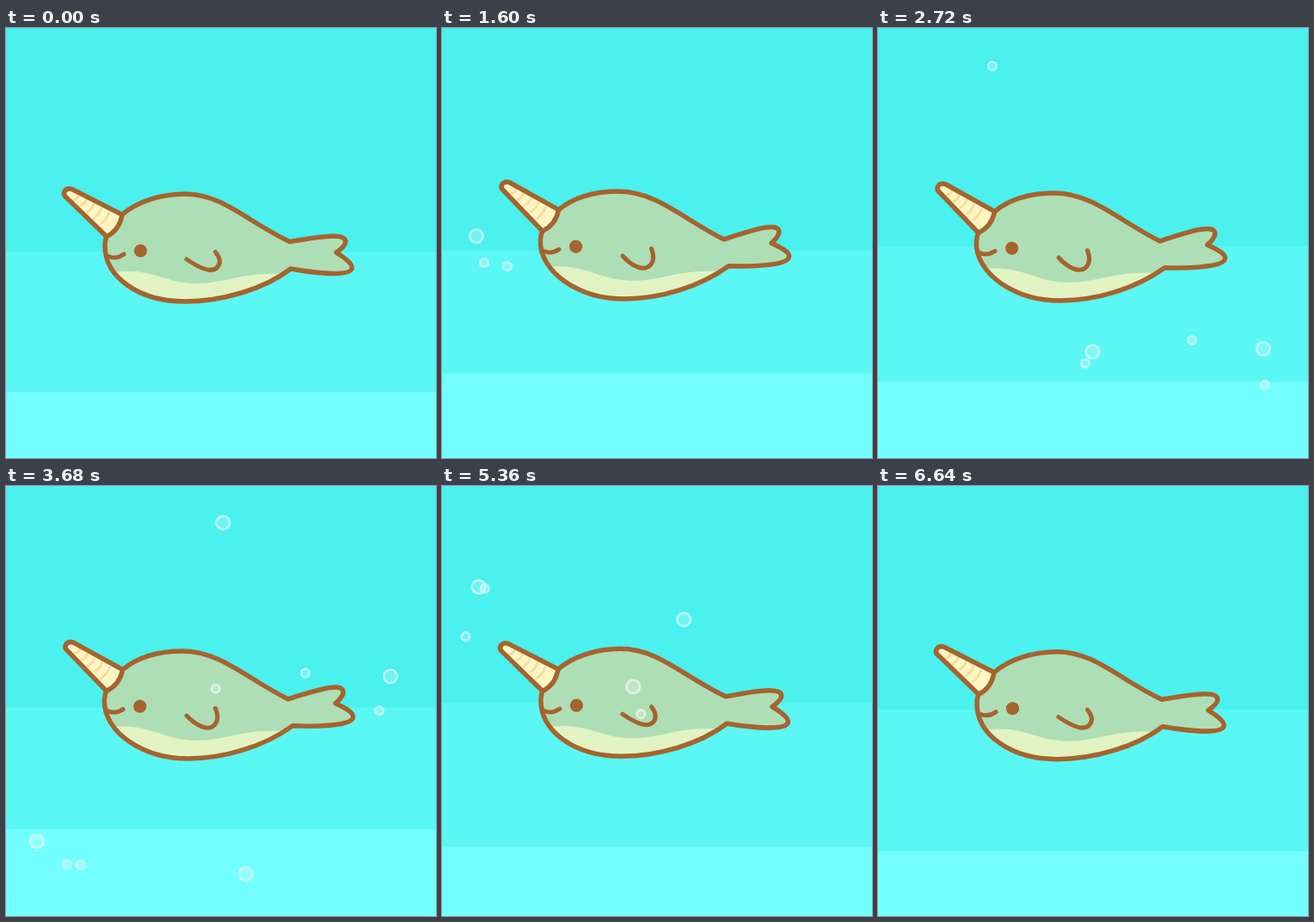
An HTML page with a canvas that plays this animation: 500 px wide and 500 px high, repeating every 6720 ms.

```html
<!DOCTYPE html>
<html lang="en">
<head>
<meta charset="utf-8">
<title>Narwhal</title>
<style>
  html, body { margin: 0; width: 100%; height: 100%; overflow: hidden; background: #4af1ee; }
  canvas { display: block; width: 100vmin; height: 100vmin; }
</style>
</head>
<body>
<canvas id="stage" width="500" height="500"></canvas>
<script>
const ctx = document.getElementById('stage').getContext('2d');
const LOOP = 6720, STEP = 80, TAU = 2 * Math.PI;
const BROWN = '#a5642e';

const mix = (a, b, u) => a + (b - a) * u;

// From 1 down to 0 and back, easing out both ways, n times per loop.
function swing(t, n) {
  const p = t * n / LOOP % 1;
  return p < .5 ? (1 - 2 * p) ** 3 : 1 - (2 - 2 * p) ** 3;
}

const upperWater = t => 252.5 + 7.5 * swing(t, 3);

// A wave that falls quickly and rises slowly, on a longer swell.
function lowerWater(t) {
  const a = TAU * t * 6 / LOOP;
  return 414 + 12 * Math.cos(a + .84 + .87 * Math.cos(a - 1.75)) + 4.8 * Math.sin(a / 2);
}

// Each wave: the time at which its bubbles are at the given places.
const bubble = (x, y, drift, pace, r = 6, behind = false) => ({ x, y, drift, pace, r, behind });
const waves = [
  [1600, bubble(40, 242, 5, 150, 9), bubble(49, 273, 5, 90), bubble(76, 277, 48, 50)],
  [2720, bubble(249.5, 376.5, 3, 220, 9, true), bubble(241, 390, 3, 17),
    bubble(365, 363, -18, 7), bubble(448, 373, -1, 14.2, 9), bubble(450, 415, -17, 16.5)],
  [3680, bubble(36, 413, 3, 11, 9), bubble(71, 440, -20, 4.5), bubble(87, 441, -17, 16.5),
    bubble(279, 451, 1, 11, 9, true)],
  [4640, bubble(234, 347, -19, 25, 9), bubble(235, 380, -6, 28)]
];

// Bubbles rise steadily, then faster and drifting sideways.
function drawBubbles(t, behind) {
  ctx.lineWidth = 2.6;
  ctx.strokeStyle = 'rgba(255,255,255,.58)';
  ctx.fillStyle = 'rgba(255,255,255,.22)';
  for (const [time, ...group] of waves) {
    const s = (t - time) / 1000, after = Math.max(0, s);
    for (const b of group.filter(b => b.behind === behind)) {
      const x = b.x + b.drift * after ** 1.5;
      const y = b.y - s * (s < 0 ? 170 : 145) - b.pace * after ** 3;
      ctx.beginPath();
      ctx.arc(x, y, b.r - 1.2, 0, TAU);
      ctx.fill();
      ctx.stroke();
    }
  }
}

// Returns a function that turns a point around a centre, as path text.
function turner(cx, cy, angle) {
  const c = Math.cos(angle), s = Math.sin(angle);
  return (x, y) => `${cx + (x - cx) * c - (y - cy) * s} ${cy + (x - cx) * s + (y - cy) * c} `;
}

function line(path, width = 5.5, color = BROWN) {
  ctx.lineWidth = width;
  ctx.strokeStyle = color;
  ctx.stroke(new Path2D(path));
}

function fill(path, color) {
  ctx.fillStyle = color;
  ctx.fill(new Path2D(path));
}

function drawBody(lift, headAngle) {
  const H = turner(210, 235, headAngle);
  const T = turner(331, 264, -lift * .148);
  const top = 208 - 3 * lift, low = 208 + 4 * lift;
  const body =
    'M' + H(135, 217) + 'C' + H(152, 202) + `${top - 28} 193 ${top} 193` +
    `C${top + 44} 193 280 225 ` + T(330, 248.5) +
    'C' + T(350, 245) + T(368, 242) + T(380, 242) +
    'C' + T(398, 242) + T(400, 250) + T(384, 261) +
    'C' + T(395, 268) + T(404, 275) + T(402, 280) +
    'C' + T(399, 289) + T(360, 285) + T(331, 280) +
    `C300 304 ${low + 42} 318 ${low} 318 C${low - 53} 318 ` + H(115, 290) + H(115, 253) +
    'Q' + H(115, 247) + H(117, 242) + 'Z';
  fill(body, '#aedeb6');
  ctx.save();
  ctx.clip(new Path2D(body));
  fill('M' + H(100, 286) + 'L' + H(112, 286) + 'C' + H(168, 275) +
    '178 296 220 297 C255 297 275 284 318 286 L345 287 V330 H100Z', '#e1f3c3');
  ctx.restore();
  line(body);

  // The flipper curls as the tail lifts.
  const F = (x, y, x2, y2) => `${mix(x, x2, lift)} ${mix(y, y2, lift)} `;
  line('M' + F(210, 269, 210, 268) +
    'C' + F(228, 281, 220, 279) + F(240, 285, 234, 287) + F(246, 278, 242, 279) +
    'C' + F(251, 272, 247, 274) + F(248, 266, 246, 266) + F(243.5, 260.5, 243.5, 259.5), 5);
}

function drawHead(angle, open) {
  ctx.save();
  ctx.translate(210, 235);
  ctx.rotate(angle);
  ctx.translate(-210, -235);

  const horn = 'M135 217L77 187.5Q71 185.5 68 190Q66 194 70 197L117 242.5Q132 235 135 217Z';
  fill(horn, '#fff6c4');
  for (let u = .17; u < .85; u += .155) {
    const upper = [mix(76, 135, u), mix(188, 217, u)];
    const lower = [mix(68, 117, u), mix(194, 243, u)];
    const across = (v, i) => mix(upper[i], lower[i], v);
    line(`M${across(.18, 0)} ${across(.18, 1)}` +
      `Q${across(.47, 0) + 2} ${across(.47, 1) + 1.6} ${across(.76, 0)} ${across(.76, 1)}`,
      2.8, '#f6dca0');
  }
  line(horn);

  line('M119 265.5Q128 269.5 137 263', 5);
  ctx.beginPath();
  ctx.ellipse(156.5, 259, 7.6, 7.6 * open, 0, 0, TAU);
  ctx.fillStyle = BROWN;
  ctx.fill();
  ctx.restore();
}

function draw(t) {
  ctx.fillStyle = '#4af1ee';
  ctx.fillRect(0, 0, 500, 500);
  ctx.fillStyle = '#5bf7f4';
  ctx.fillRect(0, upperWater(t), 500, 500);
  ctx.fillStyle = '#74ffff';
  ctx.fillRect(0, lowerWater(t), 500, 500);

  drawBubbles(t, true);
  const lift = 1 - swing(t, 6);
  const headAngle = lift * .036;
  const blink = Math.min(1, .1 + Math.abs(t - 4700) / 115);
  ctx.save();
  ctx.translate(0, 2 * Math.cos(TAU * t * 7 / LOOP) - 2);
  drawBody(lift, headAngle);
  drawHead(headAngle, blink);
  ctx.restore();
  drawBubbles(t, false);
}

ctx.lineCap = ctx.lineJoin = 'round';
const start = performance.now();
function tick() {
  const t = (performance.now() - start) % LOOP;
  draw(Math.floor(t / STEP) * STEP);
  requestAnimationFrame(tick);
}
tick();
</script>
</body>
</html>
```
